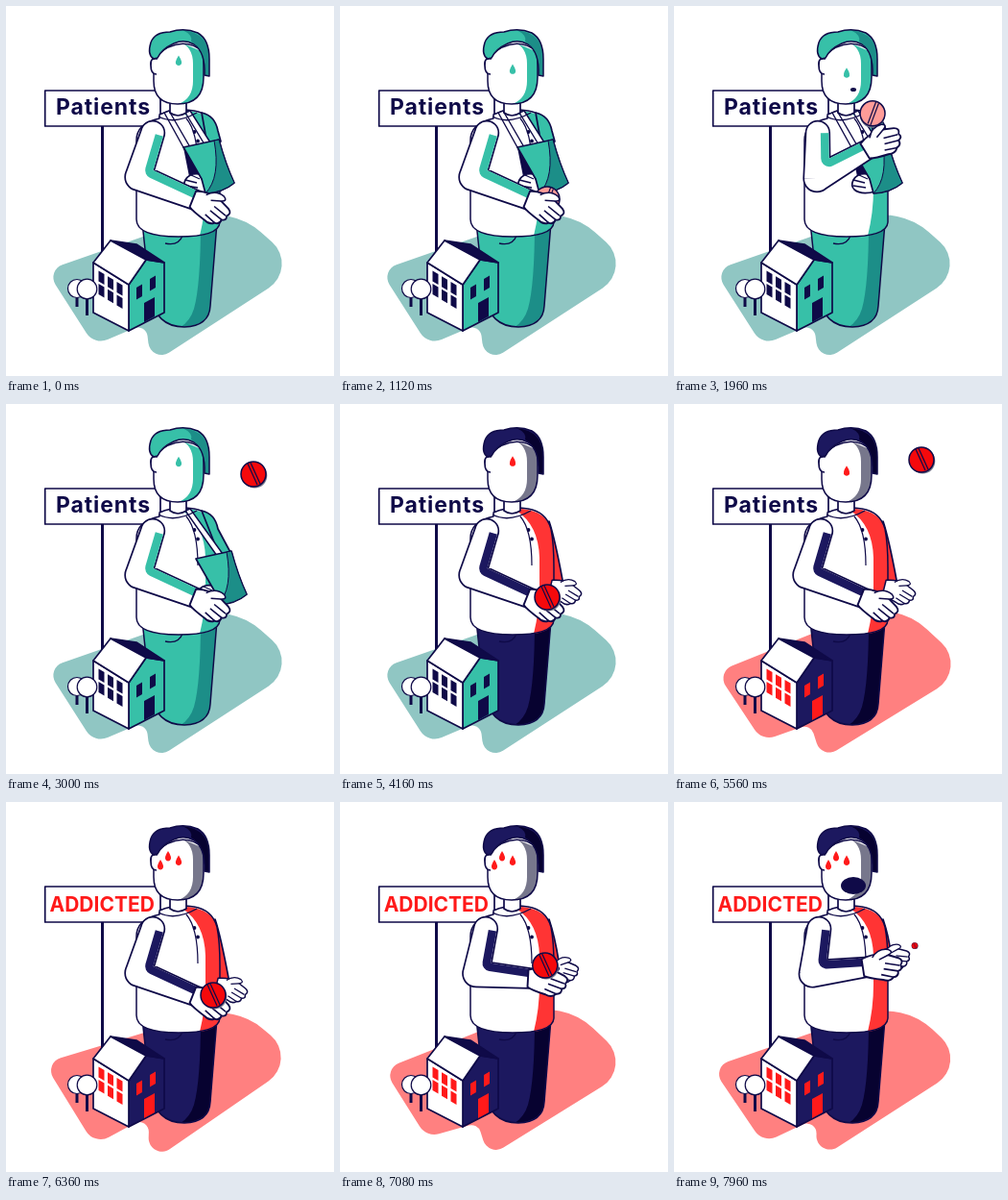
Recreate the animation shown at these times as an HTML page with a canvas. Size 342x385 px, loop 8 s.

```html
<!DOCTYPE html>
<html lang="en">
<head>
<meta charset="utf-8">
<title>Patients</title>
<style>
html, body { margin: 0; width: 100%; height: 100%; overflow: hidden; background: #fff; }
canvas { display: block; width: 342px; height: 385px; }
</style>
</head>
<body>
<canvas id="stage"></canvas>
<script>
const LOOP = 8000, NAVY = '#0f0a48', INK = '#1c185f', TEAL = '#37c0a8', DEEP = '#1c8e88', RED = '#ff1a1a';
const canvas = document.getElementById('stage'), ctx = canvas.getContext('2d');
const ratio = window.devicePixelRatio || 1;
canvas.width = 342 * ratio;
canvas.height = 385 * ratio;

const clamp = x => Math.max(0, Math.min(1, x));
const ramp = (t, from, to) => {
  const x = clamp((t - from) / (to - from));
  return x * x * (3 - 2 * x);
};
const lerp = (a, b, k) => a + (b - a) * k;
const channels = hex => [1, 3, 5].map(i => parseInt(hex.slice(i, i + 2), 16));
const mix = (a, b, k) => {
  const end = channels(b);
  return `rgb(${channels(a).map((v, i) => Math.round(lerp(v, end[i], k)))})`;
};

function paint(d, fill, stroke = NAVY, width = 1.7) {
  const path = d instanceof Path2D ? d : new Path2D(d);
  if (fill) { ctx.fillStyle = fill; ctx.fill(path); }
  if (stroke) { ctx.strokeStyle = stroke; ctx.lineWidth = width; ctx.stroke(path); }
}
const line = (d, width = 1.5, color = NAVY) => paint(d, null, color, width);

function ellipse(x, y, rx, ry, fill, stroke = null, width = 1.5) {
  const path = new Path2D();
  path.ellipse(x, y, rx, ry, 0, 0, 7);
  paint(path, fill, stroke, width);
}

function local(draw, x, y, degrees = 0, scale = 1, alpha = 1) {
  ctx.save();
  ctx.translate(x, y);
  ctx.rotate(degrees * Math.PI / 180);
  ctx.scale(scale, scale);
  ctx.globalAlpha *= alpha;
  draw();
  ctx.restore();
}

// A pill appears, falls into the hands, is lifted and swallowed.
const FALL = 620;
const doses = [
  { appear: 150, caught: 940, lift: 1250, swallow: 2260, color: '#ff9c98', behind: true },
  { appear: 2600, caught: 3420, lift: 4300, swallow: 4850 },
  { appear: 5150, caught: 6250, lift: 6840, swallow: 7540 },
  { appear: 7200, caught: 8085, lift: 7990, swallow: 8000 }
];
const raised = t => Math.max(0.45 * ramp(t, 7500, 7650),
  ...doses.map(d => ramp(t, d.lift, d.swallow) - ramp(t, d.swallow, d.swallow + 350)));
const gape = t => Math.max(
  ...doses.map(d => ramp(t, d.swallow - 400, d.swallow - 80) - ramp(t, d.swallow, d.swallow + 150)));

function drawPills(t, behind) {
  for (const { appear, caught, lift, swallow, color = '#f5090c', behind: under = false } of doses) {
    if (t <= appear || t >= swallow || under !== behind) continue;
    const fall = clamp((t - caught + FALL) / FALL) ** 2, up = ramp(t, lift, swallow);
    const x = lerp(258, 216, fall ** 4) - 28 * up + 100 * up * up * (1 - up);
    const y = lerp(58, 201, fall) - 113 * up;
    const scale = ramp(t, appear, appear + 180) * (1 - ramp(t, swallow - 120, swallow));
    local(() => {
      ellipse(1.3, 1.5, 13, 13, '#77778c');
      ellipse(0, 0, 13, 13, color, NAVY);
      line('M-6-11L4 11M-3-12L7 10', 1.2);
    }, x, y, under ? 45 : 0, scale);
  }
}

// Rounded polygon of [x, y, radius] corners that trembles once it turns red.
function drawBlob(t, k) {
  const corners = [[42, 275, 14], [235, 208, 70], [307, 272, 30], [151, 373, 14], [146, 330, 10], [92, 353, 18]]
    .map(([x, y, r], i) => [x + k * 4 * Math.sin(t / 260 + i * 2), y + k * 4 * Math.sin(t / 210 + i * 3), r]);
  const path = new Path2D(), [[ax, ay], [bx, by]] = corners;
  path.moveTo((ax + bx) / 2, (ay + by) / 2);
  for (let i = 1; i <= corners.length; i++) {
    const [x, y, r] = corners[i % 6], [nx, ny] = corners[(i + 1) % 6];
    path.arcTo(x, y, nx, ny, r);
  }
  paint(path, mix('#90c6c3', '#ff8080', k), null);
}

function drawSign(t) {
  line('M100.5 125V256', 3);
  paint('M40.7 88H161V125H40.7Z', '#fff');
  const addicted = t >= 6300;
  ctx.fillStyle = addicted ? RED : NAVY;
  ctx.font = `700 ${addicted ? 21 : 23}px Inter, sans-serif`;
  ctx.letterSpacing = addicted ? '0px' : '0.9px';
  ctx.fillText(addicted ? 'ADDICTED' : 'Patients', addicted ? 46.5 + Math.sin(t / 130) : 52, addicted ? 114 : 113);
}

function drawHouse(k) {
  const glass = mix(NAVY, RED, k);
  paint('M128 290L146 264L165 267V319L128 338Z', mix(TEAL, INK, k));
  paint('M91 267L128 290V338L91 319Z', '#fff');
  paint('M109 244L136 248L165 267L146 264Z', NAVY);
  paint('M91 267L109 244L146 264L128 290Z', '#fff');
  for (let i = 0; i < 6; i++) {
    const col = i % 3, row = Math.floor(i / 3);
    paint(`M${96.5 + col * 9.5} ${275.5 + col * 5.7 + row * 13.5}l6 3.5v11l-6-3.5z`, glass, null);
  }
  paint('M136 293l6-3.5v12.5l-6 3.5zM150 284l6-3.5v12.5l-6 3.5zM144 309l11-6v20l-11 6z', glass, null);
  line('M74 302V313M84.5 303V322', 3);
  ellipse(74, 294, 9.5, 9.5, '#fff', NAVY, 1.2);
  ellipse(84.5, 294.5, 10.3, 10.3, '#fff', NAVY, 1.2);
}

function drawLegs(tone) {
  const legs = 'M142 225L150 300Q156 334 186 334Q212 333 213 312L220 225Z';
  paint(legs, tone.legs, null);
  paint('M203 225Q203 290 196 315Q192 328 182 334Q212 333 213 312L220 225Z', tone.dark, null);
  line(legs);
  line('M166 247Q180 250 184 239', 1.3);
}

function drawTorso(tone) {
  const shirt = 'M160 113Q176 106 196 109Q215 112 220 130Q223 145 223 170V225Q222 240 180 240Q136 240 136 222V140Q136 122 160 117Z';
  paint(shirt, '#fff', null);
  paint('M190 109Q215 112 220 130Q223 145 223 170V225Q222 236 202 239Q208 215 208 190V160Q207 126 184 111Z', tone.strip, null);
  line(shirt);
  line('M188 117Q200 131 200 168', 1.2);
  ellipse(196.5, 131, 1.9, 1.9, NAVY);
  ellipse(200, 140.5, 1.9, 1.9, NAVY);
}

function drawSling(t) {
  const slack = ramp(t, 1960, 2500), dx = 13 * slack, dy = 14 * slack;
  const strap = (x, toX, toY) =>
    paint(`M${x} 111L${x + 5} 109L${toX + 6 + dx} ${toY - 2 + dy}L${toX + dx} ${toY + dy}Z`, '#fff', NAVY, 1.4);
  paint(`M204 111Q218 114 221 130L${224 + dx * 0.8} ${141 + dy}L${210 + dx} ${145 + dy}Z`, TEAL);
  local(() => strap(165, 186, 149), 0, 0, 0, 1, 1 - slack);
  strap(187, 207, 144);
  local(() => {
    local(() => paint('M186 148L192 178L204 182Z', NAVY), 0, 0, 0, 1, 1 - slack);
    paint('M187 181Q192 173 202 175L210 193Q195 197 188 191Q184 187 187 181Z', '#fff');
    line('M187 181L199 184M187 187L200 189M193 176L202 180', 1.3);
    paint('M185 147L222 139Q229 165 238 184Q226 194 208 195L204 180Z', TEAL);
    paint('M222 139Q229 165 238 184Q226 194 208 195Q224 178 217 140Z', DEEP, NAVY, 1);
  }, dx, dy);
}

function drawTear(x, y, color) {
  local(() => paint('M0-5.5Q5 2 2 4.3Q0 5.5-2 4.3Q-5 2 0-5.5Z', color, null), x, y);
}

function drawHead(t, tone) {
  paint('M171 92V111Q179 117 188 111V92Z', '#fff');
  line('M159 115Q176 124 199 111', 1.4);
  const face = 'M154 54V78Q154 102 179 102Q206 102 206 74V48Q182 28 154 54Z';
  paint(face, '#fff', null);
  paint('M180 37Q195 42 195 60V78Q195 96 180 102Q206 102 206 74V48Z', tone.shadow, null);
  line(face);
  paint('M158 55Q150 53 151 62Q151 71 157 71', '#fff');
  const hair = 'M154 55Q147 51 151 38Q155 27 171 27Q186 22 200 28Q212 35 212 55V73L207 72Q208 48 196 40Q186 34 175 39Q162 45 158 54Z';
  paint(hair, tone.hair, null);
  paint('M184 25Q212 28 212 55V73L207 72Q208 46 193 37Q195 30 184 25Z', tone.dark, null);
  line(hair);

  const slide = 6.5 * (1 - Math.cos(t * 2 * Math.PI / 3600));
  drawTear(180, lerp(57 + slide, 61, ramp(t, 5900, 6300)), tone.tear);
  if (t > 6200) {
    drawTear(161, 65.5, RED);
    drawTear(169, 56.5, RED);
  }
  const open = gape(t);
  if (open > 0.01) ellipse(187, 87, 13 * open, 9 * open, NAVY);
}

function drawHand(x, y, angle, scale) {
  local(() => {
    paint('M-3-8C6-11 14-11 20-9L31-4Q36-1 32 3Q34 7 29 8Q29 13 24 13Q20 17 14 14C6 12 0 10-3 8Z', '#fff');
    line('M31 3L18-1M29 8L16 4M24 13L13 9', 1.4);
    paint('M7-8Q14-16 23-13Q28-10 22-8L13-5', '#fff', NAVY, 1.4);
  }, x, y, angle, scale);
}

// The upper edge of a segment between two [x, y, radius] joints.
function edge([x, y, r], [x2, y2, r2]) {
  const a = Math.atan2(y2 - y, x2 - x), nx = Math.sin(a), ny = -Math.cos(a);
  return [x + nx * r, y + ny * r, x2 + nx * r2, y2 + ny * r2];
}

function crossing([ax, ay, bx, by], [cx, cy, dx, dy]) {
  const ux = bx - ax, uy = by - ay, vx = dx - cx, vy = dy - cy;
  const s = ((cx - ax) * vy - (cy - ay) * vx) / (ux * vy - uy * vx);
  return [ax + ux * s, ay + uy * s];
}

function drawLeftArm(lift, tone) {
  const shoulder = [lerp(153, 149, lift), 132, 11.5];
  const elbow = [lerp(138, 152, lift), lerp(178, 180, lift), 13];
  const wrist = [lerp(198, 203, lift), lerp(202, 135, lift), 9.5];
  const shape = new Path2D();
  for (const [a, b] of [[shoulder, elbow], [elbow, wrist]]) {
    const part = new Path2D(), [x1, y1, x2, y2] = edge(a, b), [x3, y3, x4, y4] = edge(b, a);
    for (const [x, y, r] of [a, b]) {
      part.moveTo(x + r, y);
      part.arc(x, y, r, 0, 2 * Math.PI);
    }
    part.addPath(new Path2D(`M${x1} ${y1}L${x2} ${y2}L${x3} ${y3}L${x4} ${y4}Z`));
    shape.addPath(part);
  }
  line(shape, 3.4);
  paint(shape, '#fff', null);
  const upper = edge(shoulder, elbow), fore = edge(elbow, wrist), [ix, iy] = crossing(upper, fore);
  ctx.save();
  ctx.clip(shape);
  line(`M${upper[0]} ${upper[1]}L${ix} ${iy}L${fore[2]} ${fore[3]}`, 17, tone.arm);
  ctx.restore();
  drawHand(wrist[0], wrist[1], lerp(22, -46, lift), 1.12);
}

const rightWrist = lift => [lerp(222, 208, lift), lerp(191, 130, lift)];

function drawSleeve(lift, tone) {
  const [x, y] = rightWrist(lift);
  paint(`M218 122Q224 140 ${x + 10} ${y - 8}L${x - 4} ${y + 6}Z`, tone.strip);
}

function draw(t) {
  const sick = ramp(t, 3500, 4100), spread = ramp(t, 4240, 4950), lift = raised(t);
  const tone = {
    legs: mix(TEAL, INK, sick), dark: mix(DEEP, '#070230', sick), hair: mix(TEAL, INK, sick),
    arm: mix(TEAL, INK, sick), strip: mix(TEAL, '#ff3434', sick),
    shadow: mix(TEAL, '#77778c', sick), tear: mix(TEAL, RED, sick)
  };
  ctx.setTransform(ratio, 0, 0, ratio, 0, 0);
  ctx.fillStyle = '#fff';
  ctx.fillRect(0, 0, 342, 385);
  ctx.lineJoin = 'round';
  drawBlob(t, spread);
  drawSign(t);
  drawLegs(tone);
  local(() => drawSleeve(lift, tone), 0, 0, 0, 1, sick);
  drawTorso(tone);
  local(() => drawSling(t), 0, 0, 0, 1, 1 - sick);
  local(() => drawHand(...rightWrist(lift), lerp(14, -40, lift), 0.9), 0, 0, 0, 1, sick);
  drawHead(t, tone);
  drawPills(t, true);
  drawLeftArm(lift, tone);
  drawPills(t, false);
  drawHouse(spread);
}

const start = performance.now();
function frame() {
  draw((performance.now() - start) % LOOP);
  requestAnimationFrame(frame);
}
frame();
</script>
</body>
</html>
```
